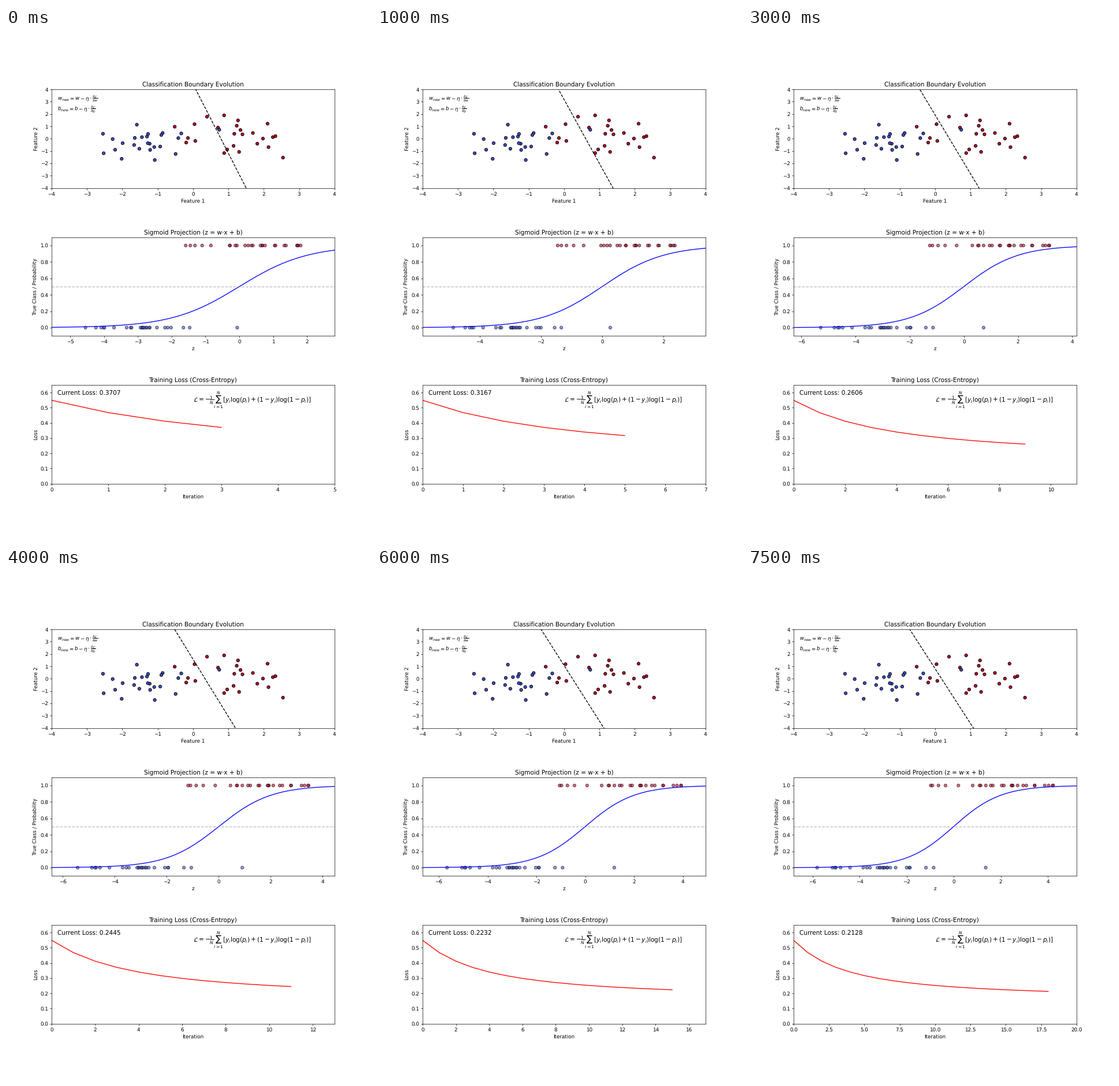
A matplotlib script that plays this animation: 632 px wide and 885 px high, repeating every 8 s.

```python
import numpy as np
import matplotlib.pyplot as plt
from matplotlib.animation import FuncAnimation

DPI = 63.2
FRAMES = 16
FIRST = 3          # iteration shown when the loop starts
RATE = 0.5         # learning rate

plt.rcParams['text.hinting'] = 'none'

# two classes centred at x = -1 and x = 1, with a noise feature as y
np.random.seed(0)
y = np.repeat([0, 1], 25)
spread, noise = np.random.randn(2, 50)
X = np.column_stack([2 * y - 1 - np.where(y, .779, .682) * spread, noise])
X, y = X[::-1], y[::-1]
XB = np.column_stack([X, np.ones(len(y))])   # last column carries the bias


def sigmoid(z):
    return 1 / (1 + np.exp(-z))


def step(theta):
    return -RATE * XB.T @ (sigmoid(XB @ theta) - y) / len(y)


def rewind(theta):
    """Parameters one descent step earlier, by fixed-point iteration."""
    prev = theta
    for _ in range(50):
        prev = theta - step(prev)
    return prev


def cross_entropy(theta):
    p = sigmoid(XB @ theta)
    return -np.mean(np.log(np.where(y, p, 1 - p)))


# theta = (w1, w2, b), known at the first shown iteration
path = [np.array([1.249, .21, -1.1415])]
for _ in range(FIRST):
    path.insert(0, rewind(path[0]))
for _ in range(FRAMES):
    path.append(path[-1] + step(path[-1]))
losses = [cross_entropy(theta) for theta in path]

fig, (ax1, ax2, ax3) = plt.subplots(
    3, 1, figsize=(632.01 / DPI, 885.01 / DPI), dpi=DPI)
fig.subplots_adjust(left=.125, right=.9, bottom=.11, top=.88, hspace=.5)


def label(ax, title, xlabel, ylabel):
    ax.set_title(title)
    ax.set_xlabel(xlabel)
    ax.set_ylabel(ylabel)


def note(ax, x, text, size):
    return ax.text(x, .95, text, transform=ax.transAxes, fontsize=size, va='top')


label(ax1, 'Classification Boundary Evolution', 'Feature 1', 'Feature 2')
ax1.set(xlim=(-4, 4), ylim=(-4, 4))
ax1.scatter(X[:, 0], X[:, 1], c=y, cmap='coolwarm', edgecolors='k')
boundary, = ax1.plot([], [], 'k--')
note(ax1, .02,
     r'$w_{new} = w - \eta \cdot \frac{\partial \mathcal{L}}{\partial w}$' '\n'
     r'$b_{new} = b - \eta \cdot \frac{\partial \mathcal{L}}{\partial b}$', 10)

label(ax2, 'Sigmoid Projection (z = w·x + b)', 'z', 'True Class / Probability')
ax2.set_ylim(-.1, 1.1)
dots = ax2.scatter(X[:, 0], y, c=y, cmap='coolwarm', edgecolors='k', alpha=.6)
curve, = ax2.plot([], [], 'b-')
ax2.axhline(.5, color='gray', linestyle='--', alpha=.5)

label(ax3, 'Training Loss (Cross-Entropy)', 'Iteration', 'Loss')
ax3.set_ylim(0, losses[0] + .1)
loss_line, = ax3.plot([], [], 'r-')
loss_text = note(ax3, .02, '', 12)
note(ax3, .5,
     r'$\mathcal{L} = {-}\frac{1}{N}\sum_{i=1}^{N}'
     r'[y_i \log(p_i) + (1-y_i)\log(1-p_i)]$', 12)


def update(frame):
    it = FIRST + frame
    z = XB @ path[it]
    lo, hi = z.min() - 1, z.max() + 1
    zs = np.linspace(lo, hi, 200)
    dots.set_offsets(np.column_stack([z, y]))
    curve.set_data(zs, sigmoid(zs))
    ax2.set_xlim(lo, hi)

    # the boundary already uses the updated weights
    w1, w2, b = path[it + 1]
    xs = np.array([-4, 4])
    boundary.set_data(xs, -(w1 * xs + b) / w2)

    loss_line.set_data(np.arange(it + 1), losses[:it + 1])
    loss_text.set_text(f'Current Loss: {losses[it]:.4f}')
    ax3.set_xlim(0, it + 2)
    return boundary, dots, curve, loss_line, loss_text


anim = FuncAnimation(fig, update, frames=FRAMES, interval=500,
                     init_func=lambda: update(0), repeat=True, repeat_delay=0)
plt.show()
```
